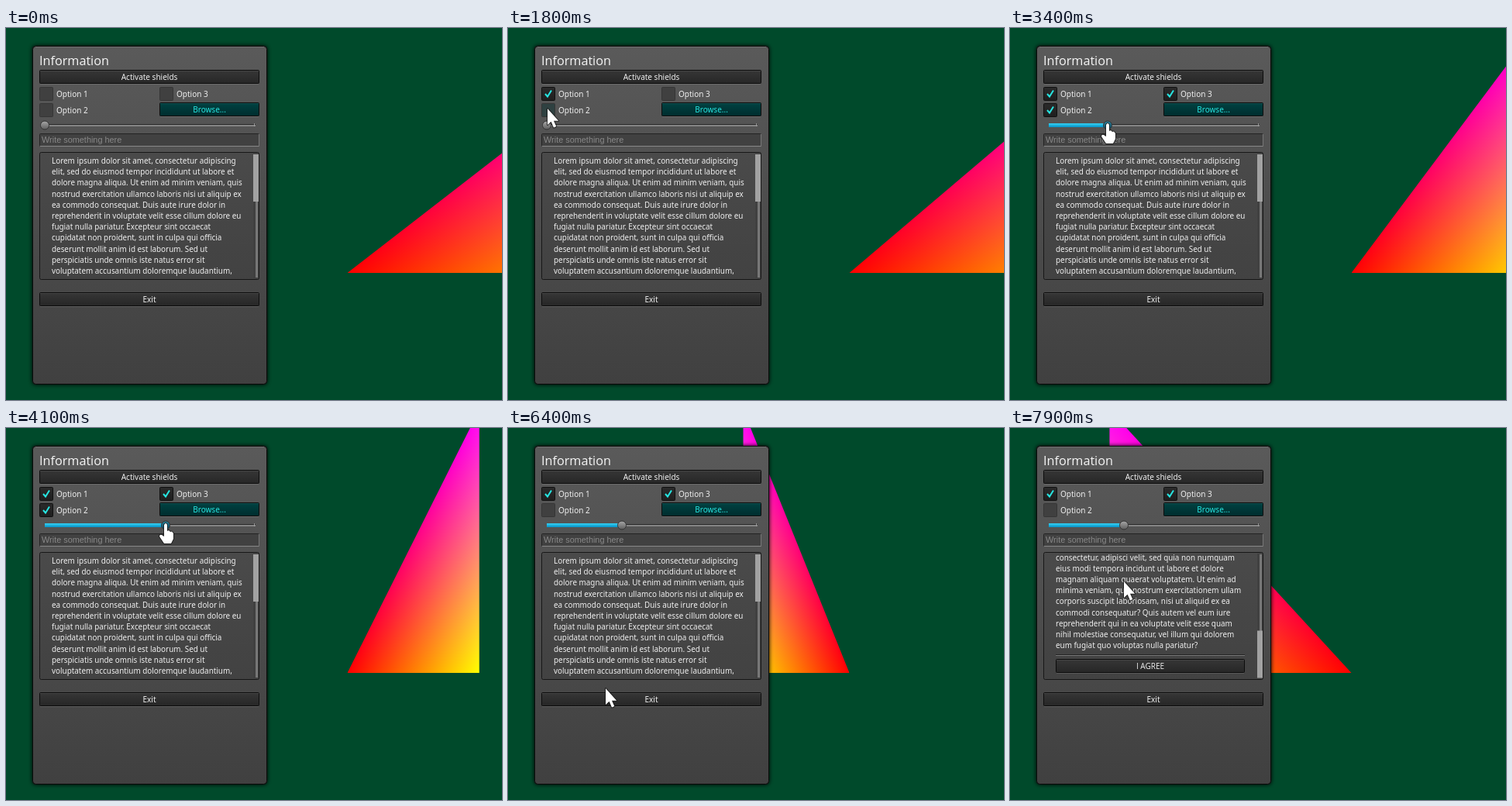
These frames come from a looping animation (640 px wide and 480 px high, 8 s). An HTML page with a canvas:

```html
<!DOCTYPE html>
<html lang="en">
<head>
<meta charset="utf-8">
<title>Information panel</title>
<style>
html, body { margin: 0; width: 640px; height: 480px; overflow: hidden; background: #004a2b; }
canvas { display: block; }
</style>
</head>
<body>
<canvas id="stage" width="640" height="480"></canvas>
<script>
const ctx = document.getElementById('stage').getContext('2d');
const LOOP = 8000, STEP = 100;
const SANS = '"Noto Sans", "Open Sans", sans-serif';
const PLAIN = '"Open Sans", "Noto Sans", sans-serif';
const CYAN = '#27e6e2';
const SCROLL_MAX = 260;

const LINES = `Lorem ipsum dolor sit amet, consectetur adipiscing
elit, sed do eiusmod tempor incididunt ut labore et
dolore magna aliqua. Ut enim ad minim veniam, quis
nostrud exercitation ullamco laboris nisi ut aliquip ex
ea commodo consequat. Duis aute irure dolor in
reprehenderit in voluptate velit esse cillum dolore eu
fugiat nulla pariatur. Excepteur sint occaecat
cupidatat non proident, sunt in culpa qui officia
deserunt mollit anim id est laborum. Sed ut
perspiciatis unde omnis iste natus error sit
voluptatem accusantium doloremque laudantium,
totam rem aperiam, eaque ipsa quae ab illo inventore
veritatis et quasi architecto beatae vitae dicta sunt
explicabo. Nemo enim ipsam voluptatem quia voluptas
sit aspernatur aut odit aut fugit, sed quia
consequuntur magni dolores eos qui ratione
voluptatem sequi nesciunt. Neque porro quisquam est,
qui dolorem ipsum quia dolor sit amet,
consectetur, adipisci velit, sed quia non numquam
eius modi tempora incidunt ut labore et dolore
magnam aliquam quaerat voluptatem. Ut enim ad
minima veniam, quis nostrum exercitationem ullam
corporis suscipit laboriosam, nisi ut aliquid ex ea
commodi consequatur? Quis autem vel eum iure
reprehenderit qui in ea voluptate velit esse quam
nihil molestiae consequatur, vel illum qui dolorem
eum fugiat quo voluptas nulla pariatur?`.split('\n');

// Pointer path: [time, x, y]
const PATH = [
  [100, 240, -28], [900, 46, 55], [1000, 24, 65], [1300, 50, 84], [1500, 50, 84],
  [1800, 51, 104], [2000, 51, 104], [2500, 205, 81], [2700, 206, 83], [3100, 50, 123],
  [3200, 50, 123], [3700, 240, 123], [4100, 206, 123], [4400, 147, 123], [4500, 147, 123],
  [4800, 52, 104], [4900, 52, 104], [5100, 79, 74], [5400, 90, 80], [6000, 140, 335],
  [6400, 126, 336], [6800, 147, 198], [8000, 147, 198]
];

function pointer(t) {
  const i = PATH.findIndex(p => p[0] > t);
  if (i < 1) return { x: -50, y: -50 };
  const [t0, x0, y0] = PATH[i - 1], [t1, x1, y1] = PATH[i];
  const k = (t - t0) / (t1 - t0);
  return { x: x0 + (x1 - x0) * k, y: y0 + (y1 - y0) * k };
}

const clamp = (v, lo, hi) => Math.min(hi, Math.max(lo, v));

function vertical(y, h, top, bottom) {
  const g = ctx.createLinearGradient(0, y, 0, y + h);
  g.addColorStop(0, top);
  g.addColorStop(1, bottom);
  return g;
}

function box(x, y, w, h, fill, stroke, r = 1) {
  ctx.beginPath();
  ctx.roundRect(x + .5, y + .5, w - 1, h - 1, r);
  ctx.fillStyle = fill;
  ctx.fill();
  ctx.strokeStyle = stroke;
  ctx.lineWidth = 1;
  ctx.stroke();
}

function rect(x, y, w, h, fill) {
  ctx.fillStyle = fill;
  ctx.fillRect(x, y, w, h);
}

function text(str, x, y, size, color = '#f0f0f0', font = SANS, align = 'left') {
  ctx.font = size + 'px ' + font;
  ctx.textAlign = align;
  ctx.fillStyle = color;
  ctx.fillText(str, x, y);
}

function button(label, x, y, w, colors = ['#373737', '#262626'], color = '#f0f0f0', font = SANS) {
  box(x, y, w, 18, vertical(y, 18, ...colors), '#0c0c0c');
  rect(x + 1, y + 1, w - 2, 1, 'rgba(255,255,255,.07)');
  rect(x + 1, y + 18, w - 2, 1, 'rgba(255,255,255,.12)');
  text(label, x + w / 2, y + 13, 10, color, font, 'center');
}

function polyline(points, color, width) {
  ctx.beginPath();
  points.forEach(p => ctx.lineTo(...p));
  ctx.strokeStyle = color;
  ctx.lineWidth = width;
  ctx.stroke();
}

function checkbox(label, x, y, on, hover) {
  if (on) box(x, y, 18, 18, vertical(y, 18, '#2b2b2b', '#1e1e1e'), '#101010');
  else box(x, y, 18, 18, hover ? '#2f4141' : '#404040', '#353535');
  if (on) polyline([[x + 5, y + 9], [x + 8, y + 12.5], [x + 13, y + 4.5]], CYAN, 2);
  text(label, x + 22, y + 13, 10);
}

// Red, yellow and magenta corners blended across a turning triangle
function triangle(t) {
  const angle = .0003 * (5379 - t) + .00022 * Math.max(0, 1000 - t);
  ctx.save();
  ctx.translate(440.5, 316);
  ctx.scale(455 * Math.sin(angle), -340);
  ctx.beginPath();
  ctx.moveTo(0, 0);
  ctx.lineTo(1, 0);
  ctx.lineTo(1, 1);
  ctx.clip();
  const blend = (x, y, color) => {
    const g = ctx.createLinearGradient(0, 0, x, y);
    g.addColorStop(0, '#000');
    g.addColorStop(1, color);
    rect(0, 0, 1, 1, g);
  };
  rect(0, 0, 1, 1, '#f00');
  ctx.globalCompositeOperation = 'lighter';
  blend(.5, -.5, '#0f0');
  blend(0, 1, '#00f');
  ctx.restore();
}

function slider(x, active) {
  rect(50, 124, 272, 1, '#2a2a2a');
  rect(50, 125, 272, 2, '#858585');
  rect(320, 123, 1, 4, '#999');
  if (x > 50) rect(50, 123, x - 50, 5, vertical(123, 5, '#35d2f5', '#0790c4'));
  ctx.beginPath();
  ctx.arc(x, 125.5, 5.5, 0, 7);
  ctx.fillStyle = active ? vertical(120, 11, '#2d829c', '#124b63') : vertical(120, 11, '#a8a8a8', '#5c5c5c');
  ctx.fill();
  ctx.strokeStyle = '#333';
  ctx.lineWidth = 1;
  ctx.stroke();
}

function textArea(scroll) {
  box(43, 160, 284, 165, vertical(160, 165, '#4a4a4a', '#424242'), '#171717', 2);
  ctx.save();
  ctx.beginPath();
  ctx.rect(45, 162, 273, 161);
  ctx.clip();
  ctx.translate(0, -scroll);
  LINES.forEach((line, i) => text(line, 59, 175 + i * 14.2, 9.9));
  rect(59, 552, 244, 1, '#222');
  rect(59, 553, 244, 1, '#777');
  button('I AGREE', 59, 558, 244, undefined, undefined, PLAIN);
  ctx.restore();
  rect(319, 162, 7, 161, '#404040');
  rect(322, 163, 3, 159, '#777');
  rect(319, 163 + scroll / SCROLL_MAX * 98.5, 7, 61, '#a2a2a2');
}

function panel(t, p) {
  ctx.save();
  ctx.shadowColor = '#000';
  ctx.shadowBlur = 5;
  box(34, 23, 303, 437, '#111', '#0a0a0a', 4);
  ctx.restore();
  box(34, 23, 303, 437, vertical(23, 437, '#5a5a5a', '#404040'), '#0a0a0a', 4);
  rect(38, 24, 295, 1, 'rgba(255,255,255,.13)');

  const over = (x, y, w) => p.x >= x && p.x < x + w && p.y >= y && p.y < y + 18;
  text('Information', 43, 48, 16.2, '#f6f6f6', PLAIN);
  button('Activate shields', 43, 54, 284);
  checkbox('Option 1', 43, 76, t >= 1400, over(43, 76, 18));
  checkbox('Option 2', 43, 97, t >= 1900 && t < 4900, over(43, 97, 18));
  checkbox('Option 3', 198, 76, t >= 2700, over(198, 76, 18));
  button('Browse...', 198, 96, 129, ['#004343', '#002c2d'], CYAN);

  const dragging = t >= 3200 && t <= 4500;
  slider(t < 3200 ? 50 : dragging ? clamp(p.x, 50, 321) : 147, dragging);

  box(43, 136, 284, 17, '#414141', '#232323');
  rect(44, 152, 283, 1, '#888');
  rect(326, 137, 1, 16, '#777');
  text('Write something here', 46, 148, 10.9, '#898989', '"Liberation Sans", Arial, sans-serif');

  textArea(SCROLL_MAX * clamp((t - 6900) / 700, 0, 1));
  button('Exit', 43, 341, 284, over(43, 341, 284) ? ['#424242', '#303030'] : undefined);
}

const ARROW = new Path2D('M0 0V21L4.6 16.8L8 24.5L11.3 23L8 15.8H14.2Z');
const HAND = new Path2D('M-2 2Q0-2 2 2V10L4 9L6 11L8 10.5L10 13V20L7 26H-2L-8 17Q-8 14-5 15L-2 17Z');

function drawPointer(p, shape) {
  ctx.save();
  ctx.translate(p.x, p.y);
  ctx.lineJoin = 'round';
  ctx.strokeStyle = 'rgba(20,20,20,.75)';
  ctx.lineWidth = 2;
  ctx.stroke(shape);
  ctx.fillStyle = '#fff';
  ctx.fill(shape);
  ctx.restore();
}

function draw(t) {
  const p = pointer(t);
  rect(0, 0, 640, 480, '#004a2b');
  triangle(t);
  panel(t, p);
  drawPointer(p, t >= 3100 && t <= 4500 ? HAND : ARROW);
}

const start = performance.now();
let shown = -1;

function tick() {
  const elapsed = performance.now() - start;
  const t = Math.floor(elapsed % LOOP / STEP) * STEP;
  if (t !== shown) draw(shown = t);
  requestAnimationFrame(tick);
}
tick();
</script>
</body>
</html>
```
